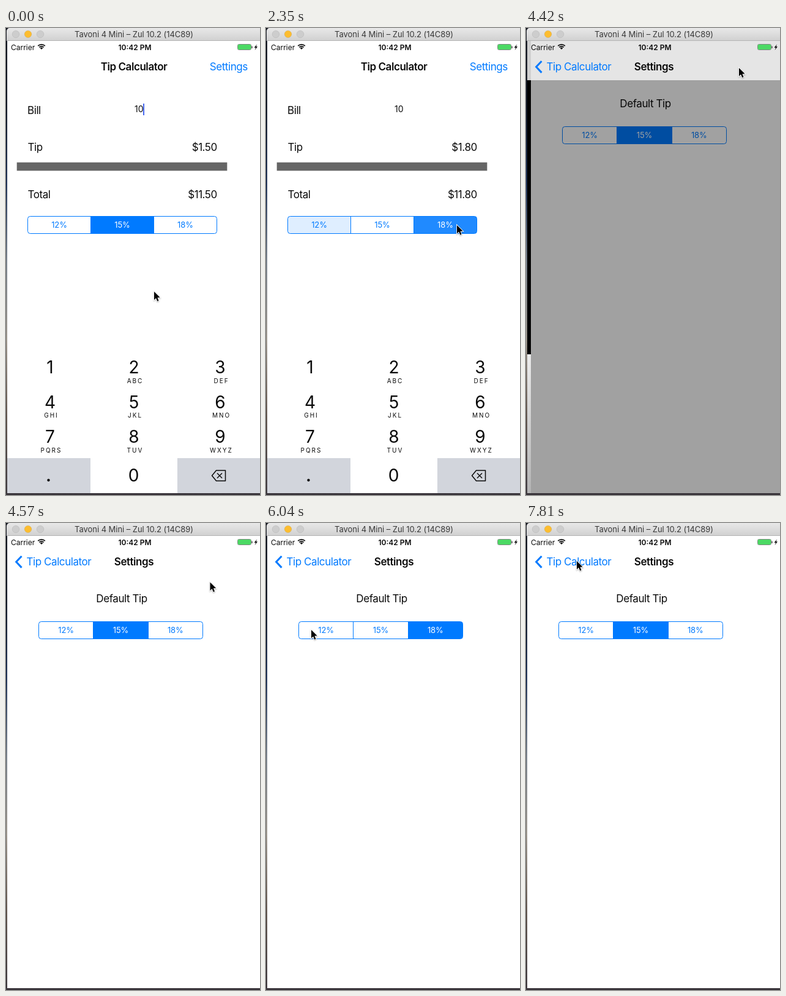
Animation of 415 by 760 pixels, one loop 8000 ms. Source, as an HTML page with a canvas:

```html
<!DOCTYPE html>
<html lang="en">
<head>
<meta charset="utf-8">
<title>Tip Calculator</title>
<style>
html, body { margin: 0; width: 100%; height: 100%; overflow: hidden; background: #fff; }
canvas { display: block; width: 415px; height: 760px; }
</style>
</head>
<body>
<canvas id="stage" width="415" height="760"></canvas>
<script>
const ctx = document.getElementById('stage').getContext('2d');
const LOOP = 8000, STEP = 147.4, LAST = 53;
const BLUE = '#007aff', INK = '#0a0a0a', KEY = '#d2d5dc';
const RATES = [12, 15, 18];

// Where the pointer rests or turns: step, x, y
const STOPS = [
  [0, 242, 429], [5, 96, 322], [9, 98, 324], [16, 312, 321], [23, 371, 74],
  [26, 359, 65], [30, 348, 65], [32, 319, 128], [36, 272, 178], [40, 30, 188],
  [41, 74, 174], [47, 180, 175], [51, 87, 77], [53, 83, 62]
];

// Chosen segment: step, index
const TIP_PICKS = [[-9, 1], [5.3, 0], [15.3, 2]];
const DEFAULT_PICKS = [[-9, 1], [35.3, 2], [43.3, 0], [47.3, 1]];

const clamp = v => Math.max(0, Math.min(1, v));
const ease = k => k * k * (3 - 2 * k);
const mix = (a, b, k) => a + (b - a) * k;
const caretAlpha = n => clamp(.7 + 1.5 * Math.cos((n + 1) / 7 * 2 * Math.PI));

function rect(x, y, w, h, color) {
  ctx.fillStyle = color;
  ctx.fillRect(x, y, w, h);
}

function box(x, y, w, h, r) {
  ctx.beginPath();
  ctx.roundRect(x, y, w, h, r);
}

function gradient(x0, y0, x1, y1, ...colors) {
  const g = ctx.createLinearGradient(x0, y0, x1, y1);
  colors.forEach((color, i) => g.addColorStop(i / (colors.length - 1), color));
  return g;
}

function fill(color) {
  ctx.fillStyle = color;
  ctx.fill();
}

function stroke(color, width) {
  ctx.strokeStyle = color;
  ctx.lineWidth = width;
  ctx.stroke();
}

function trace(points) {
  ctx.beginPath();
  points.forEach(([x, y]) => ctx.lineTo(x, y));
}

function line(points, color, width) {
  trace(points);
  stroke(color, width);
}

function text(s, x, y, size, { align = 'left', weight = 400, color = INK, gap = 0 } = {}) {
  ctx.font = `${weight} ${size}px Inter, Roboto, sans-serif`;
  ctx.letterSpacing = gap + 'px';
  ctx.textAlign = align;
  ctx.fillStyle = color;
  ctx.fillText(s, x, y);
}

const label = (s, x, y, opts) => text(s, x, y, 17, { gap: -.43, ...opts });

function pickState(picks, n) {
  const done = picks.filter(p => p[0] <= n);
  const [now, before = now] = done.reverse();
  return { now: now[1], before: before[1], fade: clamp((n - now[0]) / .8) };
}

function segments(x, y, w, { now, before, fade }) {
  const h = 28, cell = w / 3, edge = i => Math.floor(x + cell * i);
  ctx.save();
  box(x, y, w, h, 4);
  ctx.clip();
  RATES.forEach((rate, i) => {
    const on = mix(before === i, now === i, fade);
    ctx.globalAlpha = on;
    rect(edge(i), y, edge(i + 1) - edge(i) + 1, h, BLUE);
    ctx.globalAlpha = 1;
    text(rate + '%', x + cell * (i + .5), y + 18.8, 13,
      { align: 'center', color: on > .5 ? '#fff' : BLUE, gap: -.08 });
  });
  [1, 2].forEach(i => rect(edge(i), y, 1, h, BLUE));
  ctx.restore();
  box(x, y, w, h, 4);
  stroke(BLUE, 1);
}

function desktop() {
  rect(0, 0, 415, 760, gradient(0, 0, 0, 760,
    '#10131c', '#0f1522', '#1d3156', '#77808a', '#99938a', '#5d5149', '#39343a'));
}

function windowBar() {
  box(1, 0, 418, 21, [5, 0, 0, 0]);
  fill(gradient(0, 0, 0, 21, '#e8e8e8', '#d0d0d0'));
  rect(2, 20, 413, 1, '#b4b4b4');
  ['#cdcdcd', '#fdbd2f', '#cdcdcd'].forEach((color, i) => {
    ctx.beginPath();
    ctx.arc(16 + 20 * i, 10, 5.8, 0, 7);
    fill(color);
    stroke('rgba(0,0,0,.1)', .8);
  });
  text('Tavoni 4 Mini – Zul 10.2 (14C89)', 209, 15, 13, { align: 'center', color: '#383838', gap: -.05 });
}

function statusBar() {
  text('Carrier', 8, 35.8, 12);
  text('10:42 PM', 210.5, 35.8, 12, { align: 'center', weight: 600 });
  [8.2, 5.2, 1.8].forEach(r => {
    ctx.beginPath();
    ctx.arc(58, 35, r, -Math.PI * .75, -Math.PI * .25);
    stroke(INK, r < 2 ? 3 : 1.7);
  });
  box(378.5, 26.5, 22, 9, 2);
  stroke('#7c8a80', 1);
  box(379, 27, 21, 8, 1);
  fill('#4cd964');
  rect(401.3, 29.5, 1.4, 3.5, '#555');
  trace([[410, 26.5], [405.5, 32], [408, 32], [406.6, 36], [411, 30.3], [408.6, 30.3]]);
  fill(INK);
}

function keypad() {
  rect(2, 700, 136, 57, KEY);
  rect(280, 700, 135, 57, KEY);
  ['', 'ABC', 'DEF', 'GHI', 'JKL', 'MNO', 'PQRS', 'TUV', 'WXYZ'].forEach((letters, i) => {
    const x = 72 + 139 * (i % 3) - (i % 3 === 1 ? 2 : 0), y = 562.3 + 56.4 * Math.floor(i / 3);
    text(i + 1, x, y, 28, { align: 'center' });
    text(letters, x + 2, y + 15.4, 10, { align: 'center', gap: 2 });
  });
  text('0', 208.5, 738.3, 28, { align: 'center' });
  text('.', 69.5, 737.5, 28, { align: 'center', weight: 600 });

  ctx.lineJoin = 'round';
  trace([[336.5, 728.5], [343.5, 720], [358.5, 720], [358.5, 737], [343.5, 737]]);
  ctx.closePath();
  stroke(INK, 1.5);
  [-4, 4].forEach(d => line([[349 - d, 728.5 - 4], [349 + d, 728.5 + 4]], INK, 1.5));
  ctx.lineJoin = 'miter';
}

function calculator(n) {
  const pick = pickState(TIP_PICKS, n), bill = 10;
  const tip = bill * RATES[pick.now] / 100;
  const money = v => '$' + v.toFixed(2);

  rect(2, 21, 413, 736, '#fff');
  label('Tip Calculator', 209, 69.3, { align: 'center', weight: 600 });
  ctx.globalAlpha = n >= 26 ? .2 : 1;
  label('Settings', 394.8, 69.3, { align: 'right', color: BLUE });
  ctx.globalAlpha = 1;

  label('Bill', 35, 140);
  text(bill, 210, 137.3, 14);
  ctx.globalAlpha = caretAlpha(n);
  rect(224, 123, 2, 19, '#4668ee');
  ctx.globalAlpha = 1;

  label('Tip', 35.5, 200);
  label(money(tip), 344.8, 200, { align: 'right' });
  rect(17.7, 218.7, 343.6, 13.6, '#666');
  label('Total', 35.5, 277);
  label(money(bill + tip), 344.8, 277, { align: 'right' });
  segments(35.5, 306.5, 309, pick);
  keypad();
}

function settings(n) {
  // The view glides in under a shade that clears as it settles
  const push = clamp(31 - n), dx = 6 * push;
  rect(2, 85, dx, 446, '#000');
  rect(2, 531, dx, 226, gradient(0, 531, 0, 757, '#ececec', '#b4b4b4'));
  rect(2 + dx, 85, 413, 672, '#fff');
  label('Default Tip', 189 + dx, 129, { align: 'center' });
  segments(53.5 + dx, 160.5, 268, pickState(DEFAULT_PICKS, n));
  rect(2 + dx, 85, 413, 672, `rgba(0,0,0,${.37 * push})`);

  rect(2, 21, 413, 64, push ? '#e5e5e5' : '#fff');
  rect(2, 21, dx, 64, '#cfcfcf');
  line([[25.5, 54], [16.7, 63.3], [25.5, 72.6]], BLUE, 3);
  label('Tip Calculator', 33.5, 69.3, { color: BLUE });
  label('Settings', 209, 69.3, { align: 'center', weight: 600 });
}

function pointer(n) {
  const i = Math.max(1, STOPS.findIndex(p => p[0] >= n));
  const [n0, x0, y0] = STOPS[i - 1], [n1, x1, y1] = STOPS[i];
  const k = ease((n - n0) / (n1 - n0));
  ctx.save();
  ctx.translate(mix(x0, x1, k), mix(y0, y1, k));
  trace([[0, 0], [0, 13.5], [3.1, 10.6], [5.3, 15.7], [7.5, 14.8], [5.4, 9.8], [9.6, 9.6]]);
  ctx.closePath();
  ctx.shadowColor = 'rgba(0,0,0,.3)';
  ctx.shadowBlur = 2;
  ctx.shadowOffsetY = 1;
  stroke('#fff', 1.8);
  ctx.shadowColor = 'transparent';
  fill('#000');
  ctx.restore();
}

function draw(now) {
  const n = Math.min(LAST, Math.floor((now % LOOP + 12) / STEP));
  desktop();
  (n < 30 ? calculator : settings)(n);
  statusBar();
  windowBar();
  pointer(n);
  requestAnimationFrame(draw);
}
requestAnimationFrame(draw);
</script>
</body>
</html>
```
